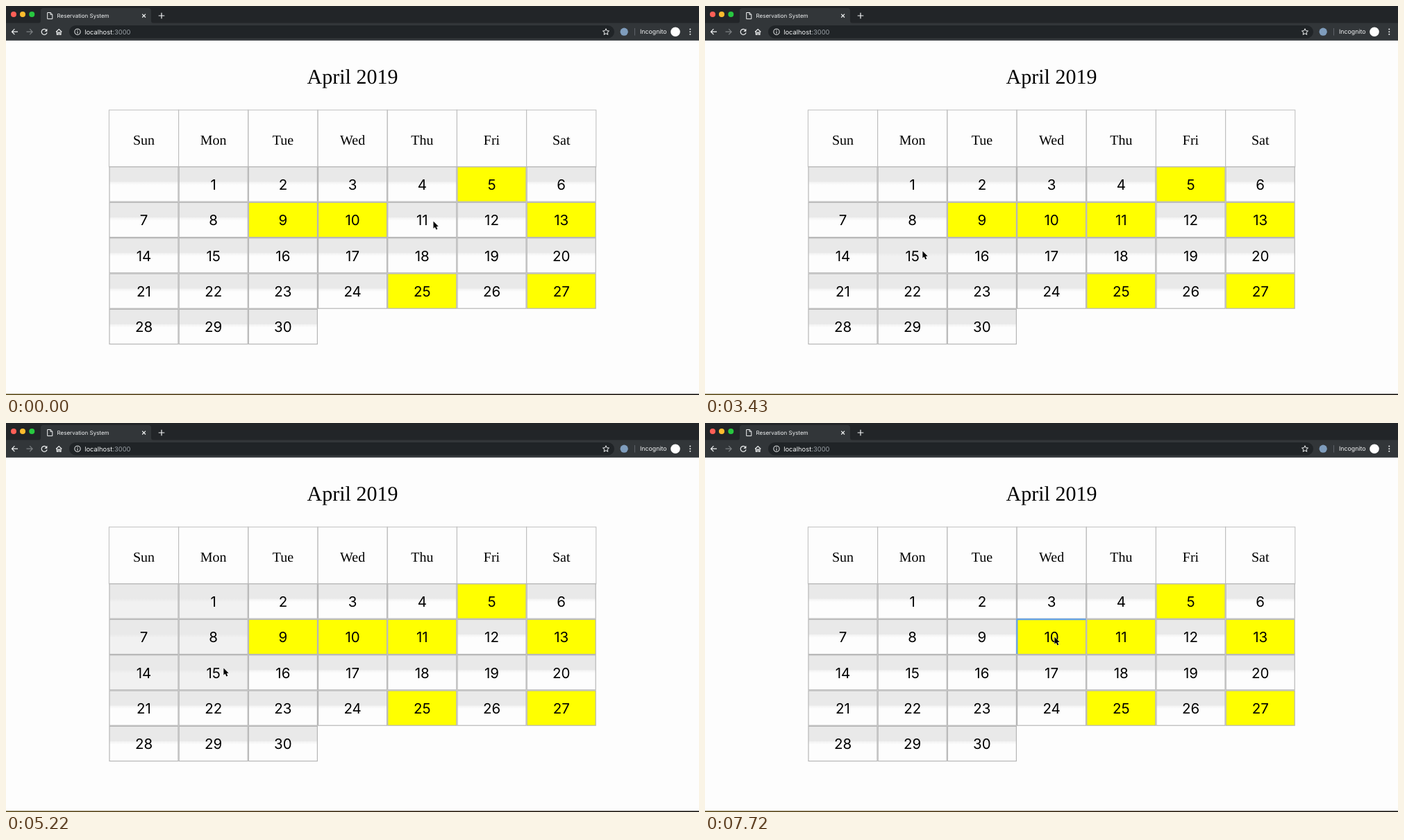
Recreate the animation shown at these times as an HTML page. Size 998 by 561 pixels, loop 8 s.

```html
<!DOCTYPE html>
<html lang="en">
<head>
<meta charset="utf-8">
<title>Reservation System</title>
<style>
  html, body { margin: 0; width: 100%; height: 100%; overflow: hidden; background: #fdfdfd; }
  svg { display: block; width: 998px; height: 561px; }
  text { font-family: Inter, sans-serif; text-rendering: geometricPrecision; }
  .serif { font-family: "Liberation Serif", serif; text-anchor: middle; }
  .day { font-size: 20.5px; text-anchor: middle; }
  .icon { fill: none; stroke: #f1f3f4; stroke-width: 1.2; }
</style>
</head>
<body>
<svg id="stage" viewBox="0 0 998 561">
  <defs>
    <linearGradient id="plain" x2="0" y2="1">
      <stop offset=".42" stop-color="#e9e9e9"/>
      <stop offset=".44" stop-color="#f3f3f3"/>
      <stop offset=".52" stop-color="#fdfdfd"/>
    </linearGradient>
    <linearGradient id="flat" x2="0" y2="1">
      <stop offset=".42" stop-color="#e9e9e9"/>
      <stop offset=".52" stop-color="#f1f1f1"/>
    </linearGradient>
    <linearGradient id="desk">
      <stop stop-color="#5c4a18"/>
      <stop offset=".35" stop-color="#4a3512"/>
      <stop offset=".6" stop-color="#2a1c0c"/>
      <stop offset="1" stop-color="#15120f"/>
    </linearGradient>
  </defs>
  <rect width="998" height="561" fill="#fdfdfd"/>
  <rect y="559.4" width="998" height="1.6" fill="url(#desk)"/>

  <g id="page">
    <text class="serif" x="499" y="112" font-size="30">April 2019</text>
  </g>

  <g id="browser">
    <rect width="998" height="25" fill="#222528"/>
    <rect y="24.5" width="998" height="25.3" fill="#323639"/>
    <path d="M46 25Q50 25 50 21V7Q50 3 54 3H205Q209 3 209 7V21Q209 25 213 25Z" fill="#323639"/>
    <circle cx="11" cy="12" r="4" fill="#ff5f57"/>
    <circle cx="24" cy="12" r="4" fill="#febc2e"/>
    <circle cx="37.3" cy="12" r="4" fill="#28c840"/>
    <text x="73.5" y="17" font-size="8" fill="#f1f3f4">Reservation System</text>
    <path class="icon" stroke-width="1" d="M196.2 11.7l4.8 4.8m0-4.8l-4.8 4.8M219.7 14h8.6M224 9.7v8.6"/>
    <rect x="91" y="28" width="785" height="18.4" rx="9.2" fill="#202427"/>
    <path class="icon" d="M17 37.2H8.6M12.4 33.2L8.5 37.2L12.4 41.2"/>
    <path class="icon" style="stroke:#7d8184" d="M29.5 37.2H38M34.2 33.2L38.1 37.2L34.2 41.2"/>
    <path class="icon" d="M72 37.4L76.2 33.5L80.4 37.4M73.4 36.6V41.2H75.2V38.2H77.2V41.2H79V36.6"/>
    <circle class="icon" style="stroke-width:1" cx="103" cy="37.2" r="4.1"/>
    <path class="icon" style="stroke-width:1" d="M103 34.7v1.1M103 36.7v3"/>
    <text x="113.2" y="40.6" font-size="9.4" fill="#f1f3f4">localhost<tspan fill="#9aa0a6">:3000</tspan></text>
    <path class="icon" style="stroke-width:1" d="M864 32.7l1.3 3 3.2.3-2.4 2.1.7 3.2-2.8-1.7-2.8 1.7.7-3.2-2.4-2.1 3.2-.3z"/>
    <circle cx="890.2" cy="37.2" r="5.6" fill="#7f9dbd"/>
    <path d="M905.5 32V42.5" stroke="#5f6368"/>
    <text x="913" y="40.4" font-size="8.8" fill="#f1f3f4">Incognito</text>
    <circle cx="964" cy="37.2" r="6.8" fill="#fff"/>
    <g fill="#f1f3f4">
      <circle cx="985.3" cy="33.6" r="1"/>
      <circle cx="985.3" cy="37.2" r="1"/>
      <circle cx="985.3" cy="40.8" r="1"/>
    </g>
    <g id="idle">
      <path class="icon" style="stroke-width:1" d="M59.7 9.5H64.2L66.8 12.1V18.6H59.7ZM64 9.7V12.3H66.6"/>
      <path class="icon" d="M58.2 34.7A4 4 0 1 0 59.1 38.3"/>
      <path d="M59.4 32.8V36.8H55.4Z" fill="#f1f3f4"/>
    </g>
    <g id="busy">
      <circle cx="64.2" cy="10.4" r=".9" fill="#dadce0"/>
      <path class="icon" d="M51.6 33.8l6.9 6.9m0-6.9l-6.9 6.9"/>
    </g>
  </g>

  <path id="ring" fill="none" stroke="#65a2ea" stroke-width="2.2"/>
  <path id="pointer" d="M0 0V10.2L2.3 8.2L4 12L5.9 11.2L4.2 7.5L7.2 7.3Z"
        fill="#000" stroke="#fff" stroke-width=".8" paint-order="stroke"/>
</svg>
<script>
const $ = id => document.getElementById(id);
const LOOP = 8000;
const LEFT = 148.4, TOP = 231.4, W = 100.2, H = 51.35;

function add(tag, attrs, text) {
  const el = document.createElementNS("http://www.w3.org/2000/svg", tag);
  for (const key in attrs) el.setAttribute(key, attrs[key]);
  if (text !== undefined) el.textContent = text;
  $("page").append(el);
  return el;
}

const cellPos = i => [LEFT + i % 7 * W, TOP + Math.floor(i / 7) * H];

["Sun", "Mon", "Tue", "Wed", "Thu", "Fri", "Sat"].forEach((name, i) => {
  const x = LEFT + i * W;
  add("rect", { x, y: 150, width: W, height: 82, fill: "none", stroke: "#bdbdbd" });
  add("text", { class: "serif", x: x + W / 2, y: 199.5, "font-size": 20 }, name);
});

// April 1st is a Monday, so a cell's index equals its day; cell 0 is blank.
const cells = Array.from({ length: 31 }, (_, day) => {
  const [x, y] = cellPos(day);
  const cell = add("rect", {
    x: x + .6, y: y + .6, width: W - 1.2, height: H - 1.2, stroke: "#b6b6b6", "stroke-width": 1.2
  });
  if (day) add("text", { class: "day", x: x + W / 2, y: y + 33.6 }, day);
  return cell;
});

const booked = [5, 9, 10, 13, 25, 27];
const blank = { busy: true, page: false, pressed: 0, ring: 0, flat: [] };
const loaded = { busy: false, page: true, ring: 0 };

// Each step changes part of the state and holds until the next one.
const steps = [
  [0, { ...loaded, at: [615.5, 310.5], booked, flat: [], pressed: 0 }],
  [150, { at: [608, 309.5] }],
  [300, { at: [603, 308.7] }],
  [450, { at: [601.2, 308.5] }],
  [1490, blank],
  [1640, { ...loaded, booked: [...booked, 11] }],
  [2540, { at: [535, 317] }],
  [2690, { at: [400, 338] }],
  [2830, { at: [326, 351] }],
  [2980, { at: [313.4, 353.4] }],
  [3280, { pressed: 15 }],
  [3430, { pressed: 0, flat: [15] }],
  [3880, blank],
  [4030, { ...loaded, booked: [...booked, 11, 15] }],
  [4620, { ring: 15 }],
  [5070, { busy: true }],
  [5220, { ...loaded, booked: [...booked, 11], flat: [0, 1, 7, 8, 14, 15] }],
  [5810, { at: [325, 347] }],
  [5960, { at: [364, 326] }],
  [6100, { at: [397, 309] }],
  [6240, { at: [405.4, 306] }],
  [6390, { ring: 9 }],
  [6840, blank],
  [6990, { ...loaded, booked: [5, 10, 11, 13, 25, 27] }],
  [7280, { at: [425, 307] }],
  [7430, { at: [475, 308] }],
  [7570, { at: [503.4, 308.5] }],
  [7720, { ring: 10 }]
];

let shown = -1;

function render(now) {
  const time = now % LOOP;
  const count = steps.filter(([start]) => start <= time).length;
  if (count !== shown) {
    shown = count;
    draw(Object.assign({}, ...steps.slice(0, count).map(step => step[1])));
  }
  requestAnimationFrame(render);
}

function draw(s) {
  const show = (id, on) => $(id).style.display = on ? "" : "none";
  show("page", s.page);
  show("idle", !s.busy);
  show("busy", s.busy);
  show("ring", s.ring);
  if (s.ring) {
    const [x, y] = cellPos(s.ring);
    $("ring").setAttribute("d", `M${x + .3} ${y + H - 1}V${y + .3}H${x + W - .5}`);
  }
  cells.forEach((cell, day) => {
    const fill = s.booked.includes(day) ? "#ff0"
      : day && day === s.pressed ? "#e4e4e4"
      : s.flat.includes(day) ? "url(#flat)" : "url(#plain)";
    cell.setAttribute("fill", fill);
  });
  $("pointer").setAttribute("transform", `translate(${s.at})`);
}

render(performance.now());
</script>
</body>
</html>
```
